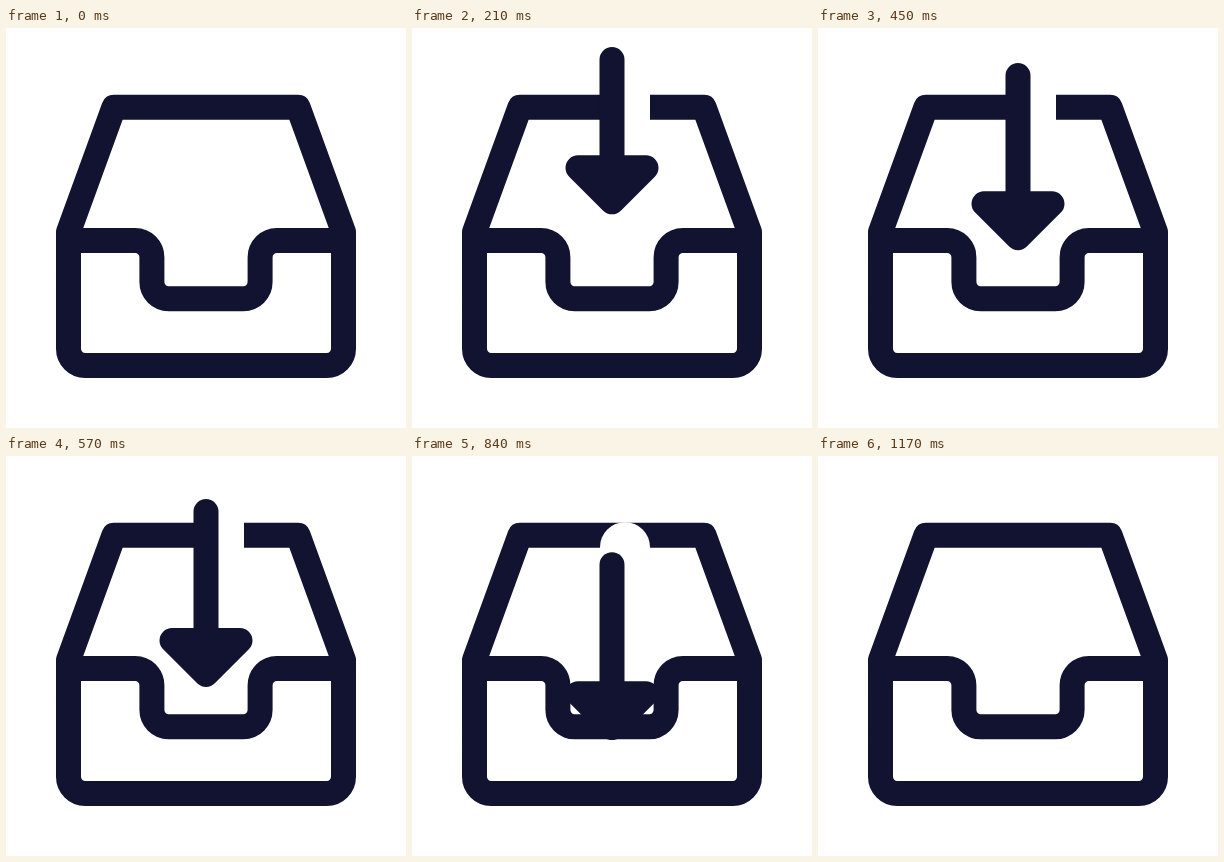
An HTML page that plays this animation: 400 by 400 pixels, repeating every 3230 ms.

```html
<!DOCTYPE html>
<html lang="en">
<head>
<meta charset="utf-8">
<title>Inbox</title>
<style>
  html, body { margin: 0; width: 100%; height: 100%; overflow: hidden; background: #fff; }
  svg { display: block; width: 100%; height: 100%; }
  path { fill: none; stroke: #121331; stroke-width: 25; stroke-linecap: round; stroke-linejoin: round; }
  #gap { stroke: #fff; stroke-width: 50; }
  #head { fill: #121331; }
</style>
</head>
<body>
<svg viewBox="0 0 400 400">
  <clipPath id="slot"><rect width="400" height="284"/></clipPath>
  <path d="M62.5 212.5V204L107.9 79.25H292.1L337.5 204V212.5"/>
  <g class="moving"><path id="gap"/></g>
  <path d="M62.5 212.5H129.2a16.7 16.7 0 0 1 16.7 16.7V254.1a16.7 16.7 0 0 0 16.7 16.7H237.4a16.7 16.7 0 0 0 16.7-16.7V229.2a16.7 16.7 0 0 1 16.7-16.7H337.5V320.8a16.7 16.7 0 0 1-16.7 16.7H79.2a16.7 16.7 0 0 1-16.7-16.7Z"/>
  <g class="moving" clip-path="url(#slot)">
    <path id="shaft"/>
    <path id="head" d="M166-46.5H234L200-12.5Z"/>
  </g>
</svg>
<script>
  const LOOP = 3230, STEP = 30, DROP = 570, END = 1020;
  const $ = id => document.getElementById(id);
  const moving = document.querySelectorAll('.moving');

  // Slow drift, then an accelerating fall into the tray.
  function tailAt(t) {
    const u = Math.max(0, (t - DROP) / (END - DROP));
    return 5 + t / 15 + 68 * u ** 2 + 137 * u ** 5;
  }

  // The shaft grows to full length with a cubic ease-out.
  function lengthAt(t) {
    return 188 - 82 * Math.max(0, 1 - t / DROP) ** 3;
  }

  function draw(now) {
    const t = Math.floor(now % LOOP / STEP) * STEP;
    const shown = t >= STEP && t < END;
    moving.forEach(g => g.setAttribute('visibility', shown ? 'visible' : 'hidden'));
    if (shown) {
      const tail = tailAt(t), tip = tail + lengthAt(t), top = tail - 5;
      $('gap').setAttribute('d', `M213 ${top}V${Math.max(top + 0.1, 100)}`);
      $('shaft').setAttribute('d', `M200 ${tail + 12.5}V${tip - 30}`);
      $('head').setAttribute('transform', `translate(0 ${tip})`);
    }
  }

  const start = performance.now();
  function tick() {
    draw(performance.now() - start);
    requestAnimationFrame(tick);
  }
  tick();
</script>
</body>
</html>
```
